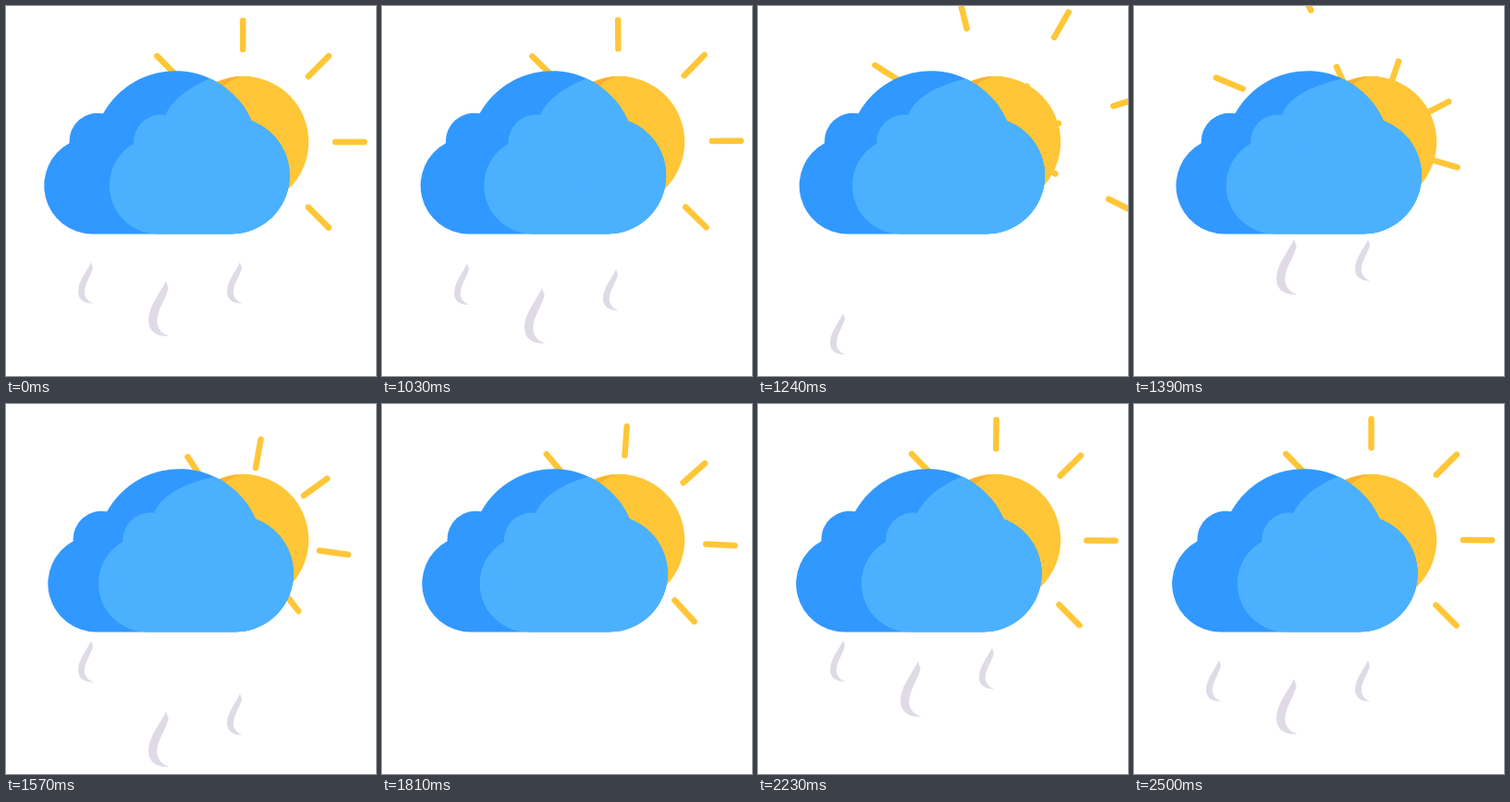
An HTML page that plays this animation: 400x400 px, repeating every 2.53 s.

```html
<!DOCTYPE html>
<html lang="en">
<head>
<meta charset="utf-8">
<title>Sun, cloud and rain</title>
<style>
  html, body { margin: 0; width: 100%; height: 100%; overflow: hidden; background: #fff; }
  svg { display: block; width: 100vw; height: 100vh; }
</style>
</head>
<body>
<svg viewBox="0 0 400 400">
  <defs>
    <path id="puff" d="M93 246.400A52.200 52.200 0 0 1 68.500 148.300A30.500 30.500 0 0 1 105 116.300A89.500 89.500 0 0 1 265.500 124.300A63 63 0 0 1 244 246.400Z"/>
    <clipPath id="inside"><use href="#puff"/></clipPath>
    <path id="drop" d="M0 0C-5 11-14 20-14 32C-14 40-8 45 2.500 44.500C-5 42-8 36-7 30C-6 22 0 14 2 6Z"/>
  </defs>
  <g id="rays" stroke="#ffc637" stroke-width="6.5" stroke-linecap="round"></g>
  <circle cx="256.200" cy="146.800" r="71" fill="#ffc637"/>
  <path d="M215 91A71 71 0 0 1 253 76Q241 80 230 91Z" fill="#fbb032"/>
  <g id="rain" fill="#e0dae7"></g>
  <g id="cloud">
    <use href="#puff" fill="#3198ff"/>
    <g clip-path="url(#inside)" fill="#4bb1ff">
      <path id="front"/>
      <g id="lobes">
        <circle cx="164" cy="194.200" r="52.200"/>
        <circle cx="168" cy="147.500" r="30"/>
      </g>
    </g>
  </g>
</svg>
<script>
const LOOP = 2530, HOLD = 1000, STEP = 30, MOVE = 1500;
const SUN = { x: 256.1, y: 146.9 }, RAY = 31.2;
const $ = id => document.getElementById(id);
const clamp = x => Math.min(1, Math.max(0, x));
const easeOut = x => Math.sin(Math.PI / 2 * clamp(x));
const easeInOut = x => (1 - Math.cos(Math.PI * clamp(x))) / 2;
const settle = (t, k) => 1 - (1 + k * t) * Math.exp(-k * t);

function add(parent, tag, attrs = {}) {
  const el = document.createElementNS('http://www.w3.org/2000/svg', tag);
  for (const k in attrs) el.setAttribute(k, attrs[k]);
  return parent.appendChild(el);
}

// Spokes at 45 degree steps; reach is how far each one travels outwards.
const rays = Array.from({ length: 5 }, (_, i) => ({
  angle: 45 * (i - 1),
  reach: i < 4 ? 93 : 215,
  leaveRate: 0.0043 + 0.00038 * i,
  arriveRate: 0.0047 + 0.00028 * i,
  leaving: add($('rays'), 'line'),
  arriving: add($('rays'), 'line')
}));

// Every drop falls through its span twice; bend sets how early it hurries.
const drops = [
  { x: 92, y: 277, size: 1, span: 195, bend: 1.4 },
  { x: 173, y: 297, size: 1.35, span: 245, bend: 0.97 },
  { x: 253, y: 277, size: 1, span: 190, bend: 0.9 }
];
for (const d of drops) d.el = add($('rain'), 'use', { href: '#drop' });

function fall({ span, bend }, t) {
  const lowest = 72, rush = 57;
  const start = 1 - Math.exp(-t / 50);
  const travel = 2 * span * easeOut(t / MOVE) ** bend * start;
  const y = (travel + span - lowest) % span - span + lowest;
  return y + 8 * Math.max(0, y - rush);
}

function placeRay(el, angle, r, shown) {
  const a = angle * Math.PI / 180, dx = Math.sin(a), dy = -Math.cos(a);
  el.setAttribute('x1', SUN.x + dx * r);
  el.setAttribute('y1', SUN.y + dy * r);
  el.setAttribute('x2', SUN.x + dx * (r + RAY));
  el.setAttribute('y2', SUN.y + dy * (r + RAY));
  el.setAttribute('visibility', shown ? 'visible' : 'hidden');
}

function draw(t) {
  for (const ray of rays) {
    const p = settle(t, ray.leaveRate);
    placeRay(ray.leaving, ray.angle - 45 * p, 100 + 60 * p + 80 * p * p, t < 540);
    const left = 1 - settle(t, ray.arriveRate);
    placeRay(ray.arriving, ray.angle + 45 * left, Math.max(0, 100 - ray.reach * left), t > 0);
  }

  for (const d of drops) {
    d.el.setAttribute('transform', `translate(${d.x} ${d.y + fall(d, t)}) scale(${d.size})`);
  }

  const sway = easeOut(t / 400) * (1 - easeInOut((t - 500) / 620));
  const shift = 4.3 * sway, slide = -16.5 * sway;
  $('cloud').setAttribute('transform', `translate(${shift} 0)`);
  $('lobes').setAttribute('transform', `translate(${slide} 0)`);
  $('front').setAttribute('d',
    `M${172 + slide} 118Q${184 + 1.15 * slide} ${94 + 0.15 * slide} 219 79L330 50V250H${164 + slide}Z`);
}

const start = performance.now();
function tick() {
  const now = (performance.now() - start) % LOOP;
  draw(Math.max(0, Math.floor((now - HOLD) / STEP) * STEP));
  requestAnimationFrame(tick);
}
tick();
</script>
</body>
</html>
```
